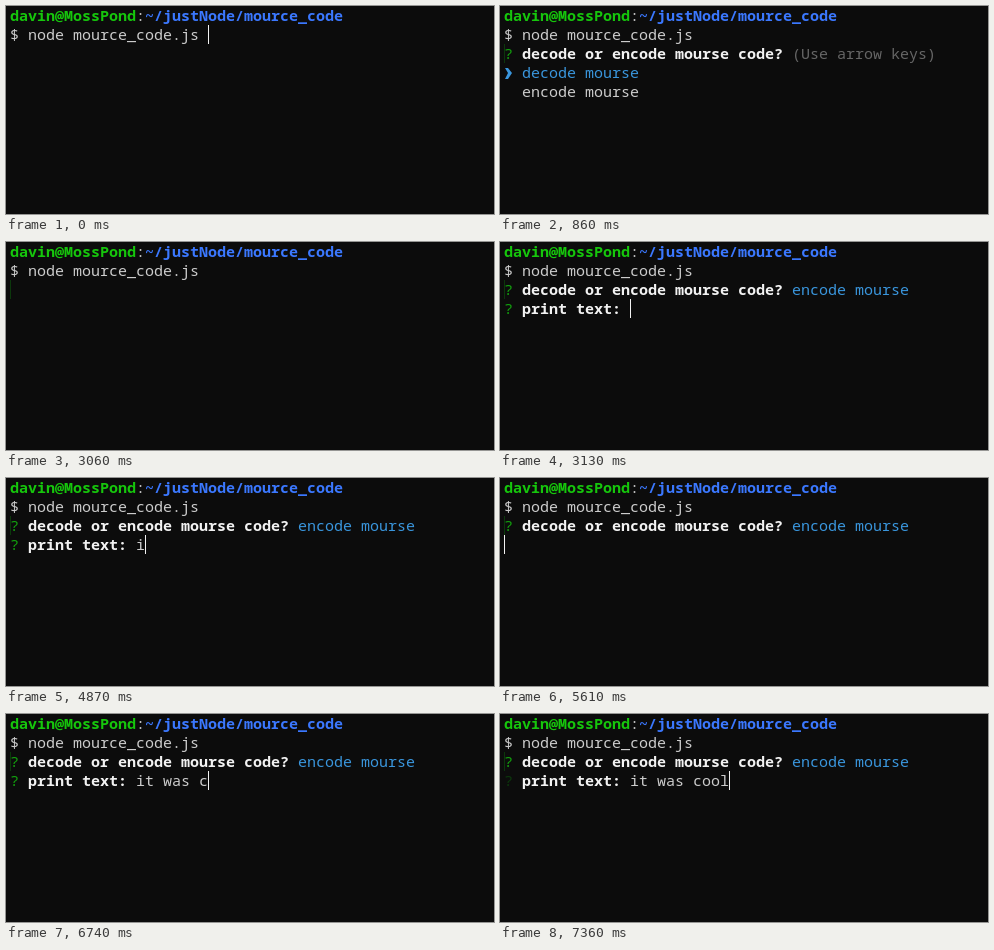
These frames come from a looping animation (488x208 px, 8000 ms). An HTML page:

```html
<!DOCTYPE html>
<html lang="en">
<head>
<meta charset="utf-8">
<title>Terminal session</title>
<style>
  html, body { margin: 0; width: 100%; height: 100%; overflow: hidden; background: #0c0c0c; }
  svg { display: block; width: 488px; height: 208px; }
  text {
    font: 500 15px "Noto Sans Mono", "DejaVu Sans Mono", monospace;
    font-variant-ligatures: none;
    white-space: pre;
  }
  .bold { font-weight: 600; }
</style>
</head>
<body>
<svg id="screen" viewBox="0 0 488 208" xmlns="http://www.w3.org/2000/svg"></svg>
<script>
const LOOP = 8000, LEFT = 4, CELL = 9, LINE = 19, BASELINE = 15;
const COLOR = {
  white: '#cccccc', bright: '#f2f2f2', gray: '#666666', green: '#13a10e',
  user: '#16c60c', path: '#3b78ff', cyan: '#3a96dd', faint: '#0c380c'
};
const ANSWER = 'it was cool';
const PROMPT_COLUMN = 14;
const svg = document.getElementById('screen');

// Each step: start time, screen, number of typed characters.
const steps = [
  [0, 'command'], [530, 'waiting'],
  [860, 'decode'], [1800, 'blank'], [1870, 'encode'], [3060, 'blank'],
  [3130, 'input', 0], [4870, 'input', 1], [5070, 'input', 2],
  [5270, 'erased'], [5340, 'input', 3],
  [5610, 'erased'], [5680, 'input', 4], [5810, 'input', 5], [6010, 'input', 6],
  [6270, 'erased'], [6340, 'input', 7],
  [6670, 'erased'], [6740, 'input', 8],
  [6940, 'erased'], [7010, 'input', 9], [7160, 'input', 10], [7360, 'input', 11]
];

const xOf = column => LEFT + column * CELL;

function print(row, column, string, color, bold) {
  return `<text x="${xOf(column)}" y="${BASELINE + row * LINE}" fill="${COLOR[color]}"` +
    `${bold ? ' class="bold"' : ''}>${string}</text>`;
}

function bar(row, column, color) {
  return `<rect x="${xOf(column)}" y="${row * LINE}" width="1" height="${LINE}" fill="${COLOR[color]}"/>`;
}

function pointer(row) {
  return `<path transform="translate(${LEFT} ${row * LINE})" d="M1 5h3l4 5-4 6h-3l3-6z" fill="${COLOR.cyan}"/>`;
}

function header() {
  return print(0, 0, 'davin@MossPond', 'user', true) +
    print(0, 14, ':', 'white') +
    print(0, 15, '~/justNode/mource_code', 'path', true) +
    print(1, 0, '$ node mource_code.js', 'white');
}

function question() {
  return print(2, 0, '?', 'green') +
    print(2, 2, 'decode or encode mourse code?', 'bright', true);
}

function menu(selected) {
  const options = ['decode', 'encode'].map((name, i) => {
    const active = name === selected;
    return (active ? pointer(3 + i) : '') +
      print(3 + i, 2, name + ' mourse', active ? 'cyan' : 'white');
  });
  return question() + options.join('');
}

const answered = () => question() + print(2, 32, 'encode mourse', 'cyan');

function input(count) {
  return answered() +
    print(3, 0, '?', count >= 9 ? 'faint' : 'green') +
    print(3, 2, 'print text:', 'bright', true) +
    print(3, PROMPT_COLUMN, ANSWER.slice(0, count), 'white') +
    bar(3, PROMPT_COLUMN + count, 'bright');
}

const screens = {
  command: () => bar(1, 22, 'bright'),
  waiting: () => bar(2, 0, 'bright'),
  blank: () => '',
  decode: () => menu('decode') + print(2, 32, '(Use arrow keys)', 'gray'),
  encode: () => menu('encode'),
  erased: () => answered() + bar(3, 0, 'bright'),
  input
};

let shown = -1;

function render(time) {
  const index = steps.findLastIndex(([start]) => start <= time);
  if (index === shown) return;
  shown = index;
  const [start, name, count] = steps[index];
  const trace = start >= 860 ? bar(2, 0, 'faint') : '';
  svg.innerHTML = header() + trace + screens[name](count);
}

const origin = performance.now();

function tick() {
  render((performance.now() - origin) % LOOP);
  requestAnimationFrame(tick);
}
tick();
</script>
</body>
</html>
```
